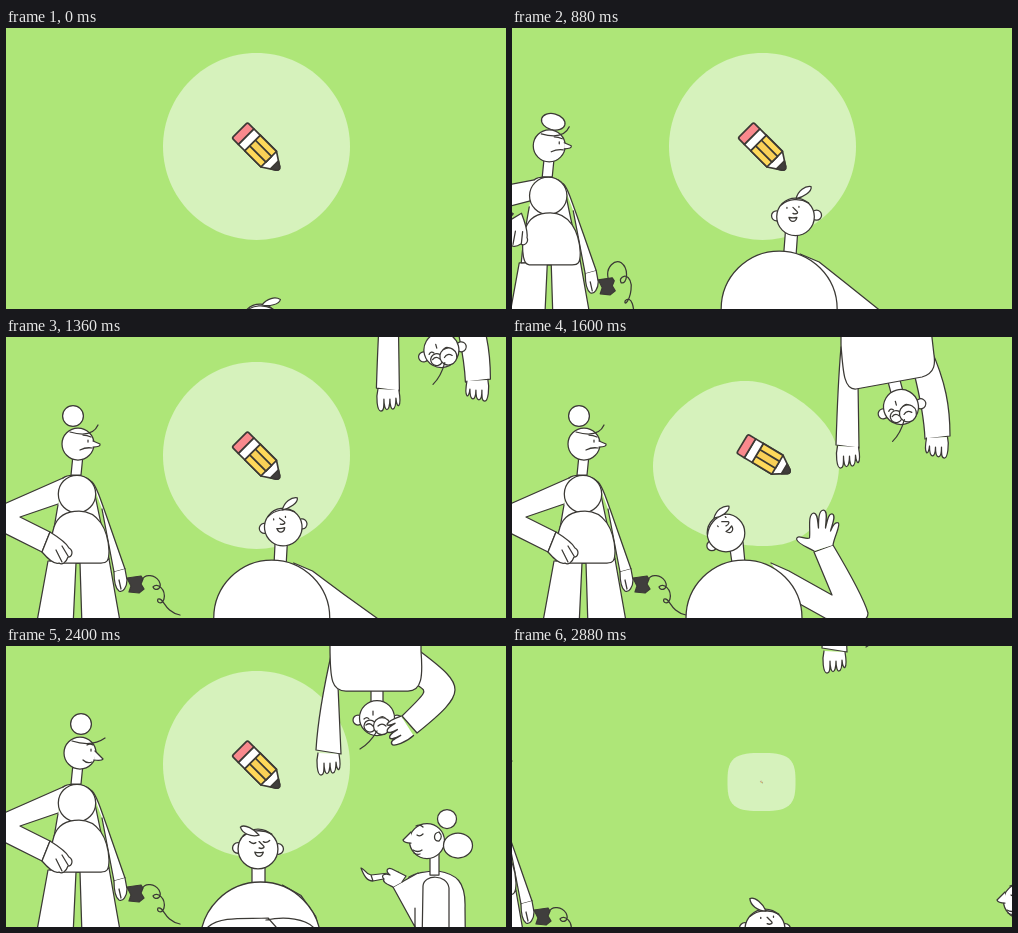
Write an HTML page that moves like this. It is 500x281 px and loops after 2920 ms.

```html
<!DOCTYPE html>
<html lang="en">
<head>
<meta charset="utf-8">
<title>Pencil crew</title>
<style>
  html, body { margin: 0; width: 100%; height: 100%; overflow: hidden; background: #aee678; }
  svg { display: block; width: 100%; height: 100%; }
  .ink { fill: #fff; stroke: #3b3935; stroke-width: 1.25; stroke-linejoin: round; stroke-linecap: round; }
  .line { fill: none; }
  .dark { fill: #403e3d; }
</style>
</head>
<body>
<svg viewBox="0 0 500 281">
  <rect width="500" height="281" fill="#aee678"/>
  <path id="blob" fill="#d6f2bc"/>

  <g id="pencil" class="ink" style="stroke-width:1.7">
    <path d="M-5 -11H18L31 -2.500Q34 0 31 2.500L18 11H-5Z"/>
    <path d="M-5 -11H18V11H-5Z" fill="#ffd95a"/>
    <path d="M-5 -4H18V4H-5Z" fill="#f9d057"/>
    <path d="M-14 -11H-5V11H-14Z"/>
    <path d="M-14 -11H-21Q-23 -11 -23 -9V9Q-23 11 -21 11H-14Z" fill="#f9898d"/>
    <path class="dark" d="M26 -5.500L31 -2.500Q34 0 31 2.500L26 5.500Z"/>
  </g>

  <g id="diver" class="ink">
    <path id="diveArmL"/>
    <path id="diveArmR"/>
    <g id="diveHead">
      <path d="M-6 -32V-12H6V-32"/>
      <circle cx="-19" cy="2" r="5"/><circle cx="20" cy="2" r="5"/>
      <circle r="17.500"/>
      <path class="line" d="M-4 -7V-3M-13 1Q-10 -2 -8 1M1 1Q5 -3 8 0"/>
      <circle cx="-7" cy="8" r="6"/><circle cx="5" cy="8" r="8.500"/>
      <path class="line" d="M-11 7Q-7 4 -4 8M1 8Q5 4 9 8M0 13C-4 20 -10 27 -17 31"/>
    </g>
    <path id="diveBody"/>
    <path id="diveHandL" d="M-10 0C-12 8 -11 22 -7 22C-4 22 -4 18 -4 10C-4 24 2 24 2 10C2 24 8 23 8 9C9 21 14 19 11 1"/>
    <path id="diveHandR" d="M-11 1C-14 18 -9 20 -8 9C-8 22 -2 22 -2 10C-2 23 4 23 4 10C4 18 4 21 7 21C10 21 12 8 10 0"/>
  </g>

  <g id="boss" class="ink">
    <path class="line" id="cord"/>
    <path d="M86 145C91 150 93 158 119 232L108 235L96 172"/>
    <path d="M108 235C108 243 109 251 113 254C117 256 121 250 121 243L119 232M113 243L115 252"/>
    <path class="dark" d="M121 241L135 239L137 242L135 247L138 252L133 256L123 255L125 249Z"/>
    <path d="M42 224L30 290H67L70 226H74L76 290H115L103 222Z"/>
    <path d="M57 141C62 137 82 137 87 147C92 175 98 200 103 222L44 224C46 200 49 185 52 168"/>
    <path id="bossArm"/>
    <circle cx="71" cy="157" r="18.700"/>
    <path d="M48 190C52 178 62 174 73 174C92 174 102 192 103 214C103 224 101 226 95 226H52C44 226 44 202 48 190Z"/>
    <path id="bossHand" d="M4 -10C12 -5 20 0 23 6C28 9 26 15 22 15C20 21 16 23 13 21C8 23 2 17 -4 10ZM10 8L16 20M16 4L22 14"/>
    <path d="M67 118L65 138H75L77 118"/>
    <ellipse id="bun"/>
    <g id="bossHead">
      <circle r="16"/>
      <path id="bossNose"/>
      <path id="bossHair" class="line"/>
      <path id="bossFace" class="line"/>
    </g>
  </g>

  <g id="man" class="ink">
    <path id="neck"/>
    <g id="torso">
      <path id="waveArm"/>
      <path id="waveHand" d="M-9.500 3C-16 -1 -26 -4 -27 -9C-26 -14 -18 -8 -14 -10C-13 -20 -16 -33 -10 -35C-5 -35 -6 -24 -5 -20C-5 -28 -5 -38 0 -38C5 -37 2 -26 2 -20C4 -28 5 -35 9 -34C13 -32 8 -22 7 -17C9 -22 12 -27 15 -25C17 -22 11 -12 9.500 -3"/>
      <path d="M183 390V281C183 249 209 223 241 223C273 223 299 249 299 281V390"/>
    </g>
    <g id="head">
      <circle cx="-19" cy="-1" r="5"/>
      <circle id="ear" r="5"/>
      <circle r="18.800"/>
      <path class="line" d="M-14 -12C-7 -18 4 -19 13 -14"/>
      <path id="leaf" d="M0 0C2 -8 9 -13 15 -12C16 -7 7 -1 0 0Z"/>
      <g id="face">
        <path class="line" id="eyes"/>
        <path class="line" d="M-2 -7C1 -4 4 -2 2 -1Q0 0 -2 -1"/>
        <path d="M-6 3Q-2 4 2 3Q1 7 -2 7Q-5 7 -6 3Z"/>
      </g>
    </g>
    <g id="chinArm">
      <path d="M165 335L222 214L246 223L200 335"/>
      <path d="M226 215C230 206 233 200 234 192C234 186 239 185 239 190L241 198C246 193 254 188 257 192C259 195 251 198 249 201C254 200 259 203 256 206C260 208 257 213 252 213C250 217 247 219 244 222M249 201L243 205M256 206L248 210"/>
    </g>
    <path id="fold" class="line" d="M202 281C215 270 238 273 262 272L270 281M260 274C280 270 300 273 308 282"/>
  </g>

  <g id="artist" class="ink">
    <path d="M403 350L409 281L400 250L403 231C412 225 424 225 432 225C450 228 460 235 459 262L460 350"/>
    <path d="M424 205V229H433V205"/>
    <circle cx="441" cy="173" r="9.500"/>
    <circle cx="421" cy="195" r="17.500"/>
    <path d="M405 186L397 194Q398 197 405 197"/>
    <ellipse cx="452" cy="199.500" rx="14.500" ry="12.500"/>
    <path class="line" d="M410 180Q414 178 417 181M411 189Q414 191 417 188M407 204Q412 207 416 204M408 207Q411 209 414 208M433 186C427 187 427 195 433 195C436 192 436 189 433 186"/>
    <path d="M416 300L417 240C418 228 441 228 443 242V300"/>
    <path d="M412 227L387 241L409 281V262"/>
    <path d="M355 222C358 222 359 228 365 229L392 226L393 230L367 235C361 235 358 230 355 222ZM365 229L367 235"/>
    <path d="M387 241C381 238 376 236 378 233C374 229 379 227 384 229C379 225 381 221 386 223L400 230L396 236"/>
  </g>
</svg>
<script>
const LOOP = 2920, STEP = 80;
const NUM = /-?\d+(\.\d+)?/g;
const ease = {
  both: u => u * u * (3 - 2 * u),
  out: u => 1 - (1 - u) ** 3,
  in: u => u * u
};
const tracks = [];
const nums = s => s.match(NUM).map(Number);

// Blend the numbers in two strings of equal structure.
function mix(a, b, u) {
  const to = nums(b);
  let i = 0;
  return a.replace(NUM, v => +(+v + (to[i++] - v) * u).toFixed(2));
}

function valueAt(keys, t) {
  const i = keys.findIndex(k => k[0] > t);
  if (i === 0) return keys[0][1];
  if (i < 0) return keys[keys.length - 1][1];
  const [a, b] = [keys[i - 1], keys[i]];
  return mix(a[1], b[1], ease[b[2] || 'both']((t - a[0]) / (b[0] - a[0])));
}

function track(id, attr, keys, build = s => s) {
  const node = document.getElementById(id);
  tracks.push(t => node.setAttribute(attr, build(valueAt(keys, t))));
}
const move = (id, ...keys) => track(id, 'transform', keys);
const shape = (id, ...keys) => track(id, 'd', keys);
const pose = (x, y, a = 0, s = 1) => `translate(${x} ${y}) rotate(${a}) scale(${s})`;
const home = pose(0, 0);
const EXIT = 2640, END = 2880;

// Closed smooth curve through eight points.
function smooth(s) {
  const n = nums(s), p = k => [n[(k + 8) % 8 * 2], n[(k + 8) % 8 * 2 + 1]];
  const ctrl = (k, dir) => [0, 1].map(c => p(k)[c] + dir * .1875 * (p(k + 1)[c] - p(k - 1)[c]));
  let d = 'M' + p(0);
  for (let k = 0; k < 8; k++) d += `C${ctrl(k, 1)} ${ctrl(k + 1, -1)} ${p(k + 1)}`;
  return d + 'Z';
}
const oval = (cx, cy, rx, ry, corner = 1) => Array.from({ length: 8 }, (_, k) => {
  const a = k * Math.PI / 4, r = k % 2 ? corner : 1;
  return (cx + rx * r * Math.cos(a)).toFixed(2) + ' ' + (cy + ry * r * Math.sin(a)).toFixed(2);
}).join(' ');

// Disc and pencil
const disc = oval(250.5, 118.5, 93.5, 93.5);
track('blob', 'd', [
  [1360, disc],
  [1600, '327 128 303 188 250 209 172 187 141 130 170 70 236 44 302 75'],
  [1920, oval(250, 118.5, 90, 96.5)],
  [2080, disc], [EXIT, disc],
  [END, oval(249.5, 136, 34, 29, 1.14), 'in']
], smooth);
const upright = pose(250, 118.5, 45);
move('pencil', [1360, upright], [1600, pose(250, 118.5, 31)], [1760, pose(250, 118.5, 48)], [1920, upright],
  [EXIT, upright], [END, pose(249.5, 136, 45, .05), 'in']);

// Figure swinging in from the top right
move('diver', [1280, pose(110, -135)], [1600, home, 'out'], [EXIT, home], [END, pose(0, -102), 'in']);
shape('diveBody',
  [1600, 'M329 -60L329 8C331 35 332 53 344 52L410 40C424 36 423 25 422 18L413 -60'],
  [1840, 'M324 -60L324 0C324 35 326 45 340 45L402 45C416 45 417 30 415 5L415 -60']);
const hangL = 'M325 8C318 40 316 70 316 104L339 107L338 40';
shape('diveArmL',
  [1600, 'M329 10C326 45 325 75 324 108L347 111L346 45'],
  [1840, hangL], [2080, hangL],
  [2400, 'M326 5C318 40 312 70 310 104L335 108L332 40']);
const hangR = 'M414 0C434 45 439 75 439 107L415 107C414 80 410 60 405 40';
shape('diveArmR',
  [1600, 'M418 10C434 45 438 70 438 99L413 102C412 80 408 60 402 36'],
  [1840, hangR], [2080, hangR],
  [2400, 'M415 6C460 40 462 46 411 87L396 70C425 42 420 46 410 38']);
move('diveHandL', [1600, pose(335.5, 109)], [1840, pose(327.5, 105)], [2080, pose(327.5, 105)],
  [2400, pose(322, 107)]);
move('diveHandR', [1600, pose(425.5, 100)], [1840, pose(427, 107)], [2080, pose(427, 107)],
  [2400, pose(402, 80, 60, 1.1)]);
move('diveHead', [1600, pose(389, 70, -15)], [1840, pose(371, 70)], [2400, pose(371, 72)]);

// Woman on the left
move('boss', [720, pose(-150, 50)], [1120, pose(-3, 0), 'out'], [1200, pose(2, -3)],
  [1360, home], [EXIT, home], [END, pose(-99, 23), 'in']);
shape('bossArm',
  [1120, 'M57 141L-15 155L-15 160L29 183L36 175L26 169L53 162'],
  [1360, 'M57 141L-20 175L-10 192L36 215L44 195L14 180L52 167']);
move('bossHand', [1120, pose(35, 180, 37)], [1360, pose(40, 205)]);
shape('cord',
  [1120, 'M131 240C128 228 138 220 144 224C152 230 150 246 144 244C140 238 152 232 154 246C154 262 146 268 148 262C154 256 158 268 156 284'],
  [1360, 'M136 243C139 236 149 238 153 244C157 252 149 255 147 250C151 245 160 252 158 262C156 268 150 266 152 262C158 260 158 275 174 278']);
move('bossHead', [1120, pose(72, 107)], [1680, pose(72, 107)], [1920, pose(74, 107)]);
move('bun', [1120, pose(76, 83, 15)], [1360, pose(67, 79)], [1680, pose(67, 79)], [1920, pose(75, 78)]);
track('bun', 'rx', [[1120, '12'], [1360, '10.4']]);
track('bun', 'ry', [[1120, '8'], [1360, '10.4']]);
shape('bossNose', [1680, 'M15 -3L22 0Q23 3 15 3'], [1920, 'M15 -2L23 6Q22 8 14 7']);
shape('bossHair', [1680, 'M-8 -12C6 -8 16 -10 20 -19'], [1920, 'M-8 -12C8 -7 18 -10 25 -15']);
shape('bossFace', [1680, 'M5 -9Q9 -9 13 -7M10 -4Q10 -3 10 -2M2 6Q8 3 14 4'],
  [1920, 'M7 -8Q10 -10 13 -8M11 -4Q11 -3 11 -2M3 7Q7 11 12 9']);

// Man in the middle
move('man', [0, pose(0, 107)], [320, pose(0, -5), 'out'], [480, home], [EXIT, home], [END, pose(1, 80), 'in']);
move('torso', [640, home], [960, pose(31, 0)], [1280, pose(31, 0)], [1600, pose(-9, 0)],
  [2080, pose(-9, 0)], [2400, pose(3.9, 4.1, 0, 1.04)]);
move('chinArm', [560, home], [800, pose(10, 110)]);
move('fold', [2080, pose(0, 60)], [2400, home]);
const neckR = 'M279 200L277 226L289 226L291 200', neckL = 'M217 205L220 226L233 226L231 205';
shape('neck', [640, 'M245 200L243 226L258 226L259 200'], [960, neckR], [1280, neckR],
  [1600, neckL], [2080, neckL], [2400, 'M246 213L246 241L259 241L259 213']);
const resting = 'M262 226L281 234L310 257L380 313L360 330C350 340 340 340 330 340C320 340 310 340 300 330L285 290';
const waving = 'M268 226L286 234L329 258L311 215L330 208C349 240 361 262 365 276C365 285 349 292 322 281L295 266';
shape('waveArm', [1280, resting], [1600, waving], [2080, waving],
  [2400, 'M262 226L280 236L294 256L300 280L299 330C298 340 298 340 296 340C294 340 294 340 290 330L285 290']);
const wave = a => pose(320.5, 211, a);
move('waveHand', [1280, pose(375, 340, 60)], [1600, wave(0)], [1760, wave(6)], [1920, wave(-6)],
  [2080, wave(4)], [2400, pose(290, 350, 30)]);
move('head', [640, pose(254, 188)], [960, pose(289, 189)], [1280, pose(289, 189)],
  [1600, pose(214, 196, -45)], [1840, pose(212, 195, -45)], [2080, pose(212, 195, -45)],
  [2400, pose(252, 203, 0, 1.06)]);
move('ear', [640, pose(21, -2)], [1280, pose(21, -1)], [1600, pose(8, 0)],
  [2080, pose(8, 0)], [2400, pose(19, 0)]);
move('leaf', [0, pose(2, -18, 22)], [400, pose(0, -20)], [1280, pose(1, -17)], [1600, pose(2, -19, 45)],
  [1920, pose(-1, -18, -70)], [2080, pose(-1, -18, -70)], [2400, pose(1, -13, -118)],
  [EXIT, pose(1, -13, -118)], [END, pose(1, -17, -104)]);
move('face', [640, pose(7, -5)], [960, pose(-2, -2)], [1280, pose(-2, -2)],
  [1600, pose(7, -4)], [2080, pose(7, -4)], [2400, pose(3, 0)], [EXIT, pose(3, 0)], [END, pose(4, -4)]);
const open = 'M-8 -7Q-8 -6.5 -8 -6M4 -8Q4 -7.5 4 -7';
const shut = 'M-11 -7Q-8 -4 -5 -6M2 -7Q5 -5 8 -8';
shape('eyes', [2240, open], [2400, shut], [EXIT, shut], [2800, open]);

// Woman with the brush
move('artist', [1920, pose(122, 82)], [2240, pose(-4, -4), 'out'], [2400, home], [EXIT, home], [END, pose(88, 60), 'in']);

function draw(ms) {
  const t = Math.floor(ms % LOOP / STEP) * STEP;
  tracks.forEach(set => set(t));
}
const start = performance.now();
function tick() {
  draw(performance.now() - start);
  requestAnimationFrame(tick);
}
tick();
</script>
</body>
</html>
```
